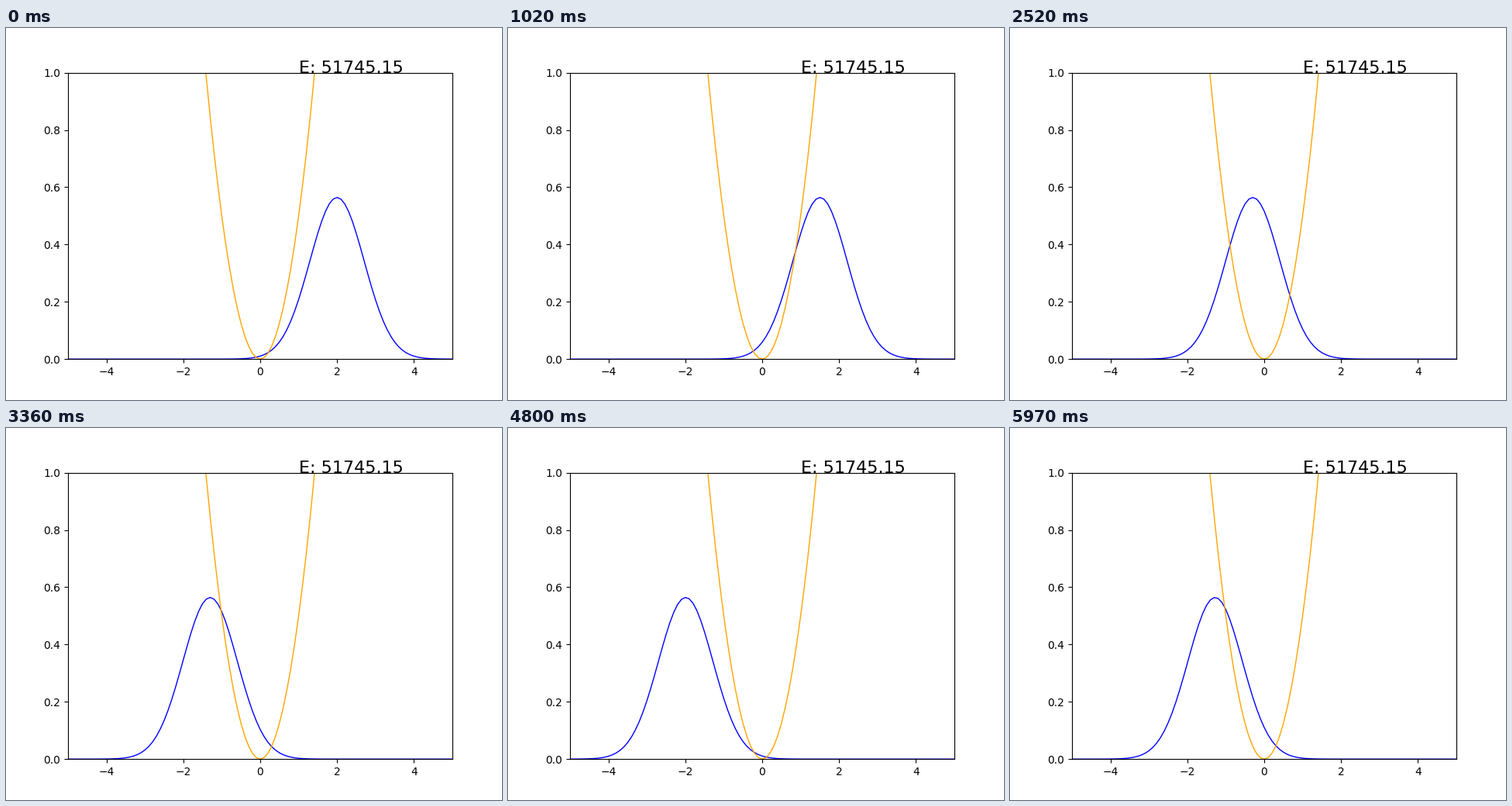
Animation of 640 by 480 pixels, one loop 6000 ms. Source, as a matplotlib script:

```python
import numpy as np
import matplotlib.pyplot as plt
from matplotlib.animation import FuncAnimation

FRAMES = 200
INTERVAL = 30
DT = 0.02
X0 = 2.0

x = np.linspace(-5, 5, 101)


def density(t):
    """Probability density of a coherent state in a harmonic well."""
    return np.exp(-(x - X0 * np.cos(t)) ** 2) / np.sqrt(np.pi)


fig, ax = plt.subplots(figsize=(6.4, 4.8), dpi=100)
ax.set_xlim(-5, 5)
ax.set_ylim(0, 1)
wave, = ax.plot(x, density(0), color="blue", lw=1)
ax.plot(x, x ** 2 / 2, color="orange", lw=1)
ax.text(1, 1, "E: 51745.15", fontsize=16)


def update(i):
    wave.set_ydata(density((i + 2) * DT))
    return wave,


anim = FuncAnimation(fig, update, frames=FRAMES, interval=INTERVAL,
                     repeat=True, repeat_delay=0)
plt.show()
```
